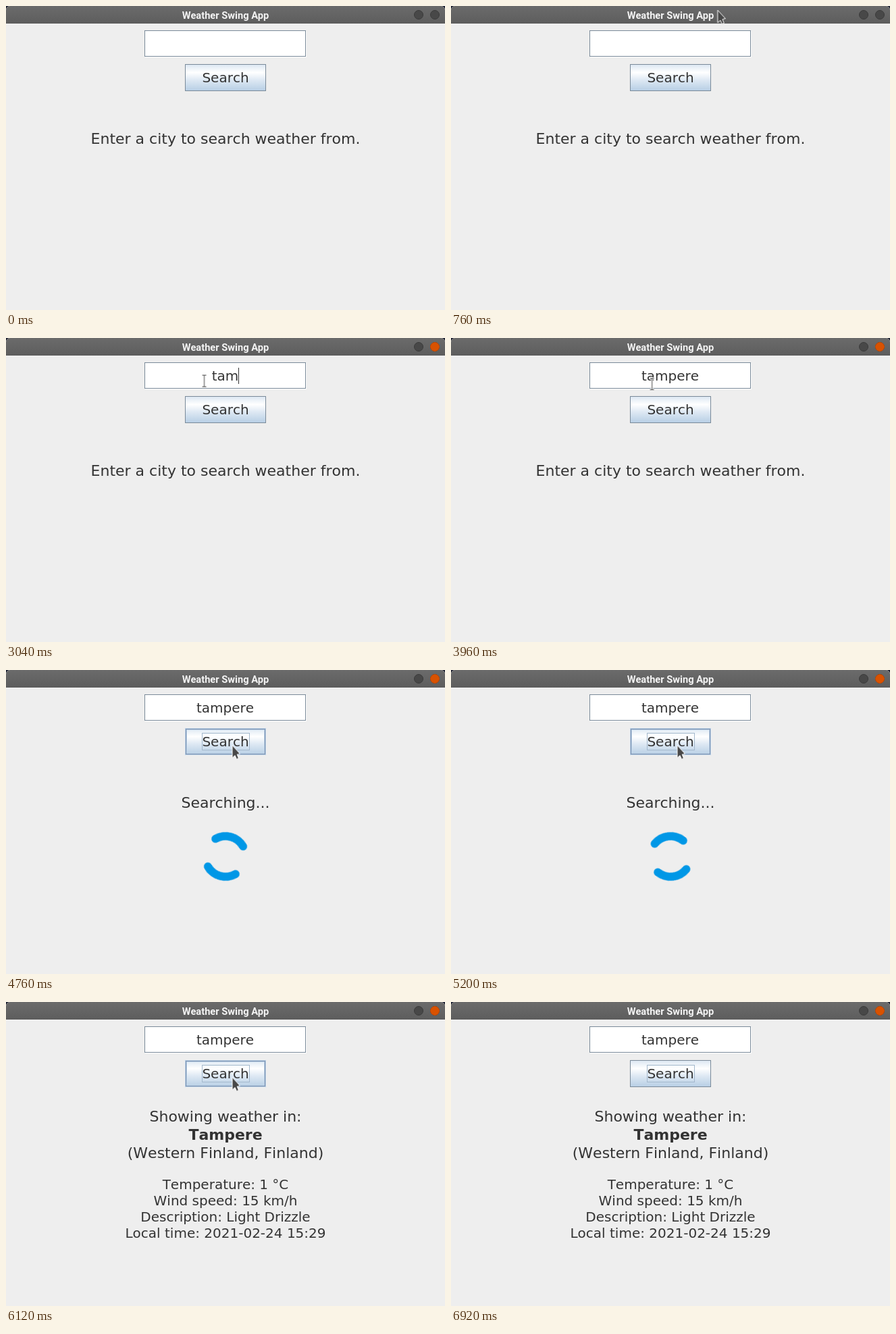
An HTML page for the animation above (7000 ms loop, 650 by 450 pixels).

```html
<!DOCTYPE html>
<html lang="en">
<head>
<meta charset="utf-8">
<title>Weather Swing App</title>
<style>
  html, body { margin: 0; width: 100%; height: 100%; overflow: hidden; }
  body { background: #171b2c; }
  div, p, i, svg { position: absolute; left: 0; top: 0; box-sizing: border-box; margin: 0; }
  #app {
    width: 650px; height: 450px; overflow: hidden;
    border-radius: 6px 6px 0 0; background: #eee; color: #333;
    font: 20px/24px "DejaVu Sans", sans-serif; font-kerning: none;
  }
  #bar {
    width: 650px; height: 26px;
    background: linear-gradient(#6b6b6b, #5d5d5d);
  }
  #bar p {
    top: 1px; width: 650px; text-align: center; color: #f4f4f4;
    font: bold 14.667px/26px Roboto, sans-serif;
  }
  #bar i {
    left: 628px; top: 6px; width: 14px; height: 14px; border-radius: 50%;
    background: #484848; border: 1px solid #3b3b3b;
  }
  #bar #minimize { left: 604px; }
  #bar #close { background: #d95200; border-color: #c84c00; }

  #field {
    left: 205px; top: 36px; width: 239px; height: 39px; padding-top: 7px;
    background: #fff; border: 1px solid #7a8a99; box-shadow: 1px 1px #fff;
    text-align: center;
  }
  #typed { position: relative; display: inline-block; height: 24px; vertical-align: top; }
  #caret { left: 100%; width: 1px; height: 24px; background: #333; }

  #button {
    left: 265px; top: 86px; width: 120px; height: 40px;
    border: 1px solid #7a8a99;
    background: linear-gradient(#dde8f3, #fff 30%, #dde8f3 60%, #b8cfe5);
  }
  #button div { left: -1px; top: -1px; width: 120px; height: 40px; }
  #hover { border: 1px solid #b8cfe5; box-shadow: inset 0 0 0 1px #7a8fae, inset 0 0 0 2px #b8cfe5; }
  #press { background: #b8cfe5; border: 1px solid #7a8a99; border-width: 2px 1px 1px 2px; }
  #button #focus { left: 24px; top: 6px; width: 71px; height: 26px; border: 1px solid #a3b8cc; }
  #button p { left: -1px; top: 7px; width: 120px; text-align: center; }

  .line { width: 650px; text-align: center; white-space: pre; }
  .big { font-size: 22px; line-height: 27px; }
  .mid { top: 183px; }
  .place { top: 156px; }
  .facts { top: 258px; }
  #spinner { left: 285px; top: 236px; width: 80px; height: 80px; }
  #pointer { overflow: visible; }
</style>
</head>
<body>
<div id="app">
  <div id="bar">
    <p>Weather Swing App</p>
    <i id="minimize"></i><i></i><i id="close"></i>
  </div>

  <div id="field"><span id="typed"><i id="caret"></i></span></div>

  <div id="button">
    <div id="hover"></div><div id="press"></div><div id="focus"></div>
    <p>Search</p>
  </div>

  <p id="hint" class="line big mid">Enter a city to search weather from.</p>

  <div id="busy">
    <p class="line big mid">Searching...</p>
    <svg id="spinner" viewBox="-40 -40 80 80" fill="none" stroke="#0097e6" stroke-width="12" stroke-linecap="round">
      <path d="M30 0A30 30 0 0 1 0 30M-30 0A30 30 0 0 1 0-30"/>
    </svg>
  </div>

  <div id="result">
    <p class="line big place">Showing weather in:
<strong>Tampere</strong>
(Western Finland, Finland)</p>
    <p class="line facts">Temperature: 1 °C
Wind speed: 15 km/h
Description: Light Drizzle
Local time: 2021-02-24 15:29</p>
  </div>

  <svg id="pointer" width="1" height="1">
    <path id="arrow" d="M0 0V18.5L4 15L6.5 20.5L9.5 19.2L7.2 13.6L11.5 12.5Z"
      fill="#484848" stroke="#fff" stroke-linejoin="round"/>
    <g id="beam" fill="none">
      <path d="M-3-8.5H3M0-8.5V8.5M-3 8.5H3" stroke="#fff" stroke-width="3"/>
      <path d="M-3-8.5H3M0-8.5V8.5M-3 8.5H3" stroke="#444"/>
    </g>
  </svg>
</div>

<script>
  const LOOP = 7000;
  const $ = id => document.getElementById(id);

  // Each key is [ms, value]; the last value holds to the end of the loop.
  function track(el, prop, keys, easing = 'linear') {
    const frames = [...keys, [LOOP, keys[keys.length - 1][1]]]
      .map(([ms, value]) => ({ offset: ms / LOOP, [prop]: value, easing }));
    el.animate(frames, { duration: LOOP, iterations: Infinity });
  }

  // Shows an element only inside the given [from, to] spans.
  function show(id, ...spans) {
    const keys = spans.flatMap(([from, to]) => [[from, 1], [to, 0]]);
    if (keys[0][0] > 0) keys.unshift([0, 0]);
    track($(id), 'opacity', keys.filter(k => k[0] < LOOP), 'step-end');
  }

  const typeTimes = [2640, 2800, 2960, 3120, 3240, 3360, 3480];
  [...'tampere'].forEach((char, n) => {
    const letter = document.createElement('span');
    letter.textContent = char;
    $('typed').insertBefore(letter, $('caret'));
    track(letter, 'fontSize', [[0, '0px'], [typeTimes[n], '20px']], 'step-end');
  });

  track($('close'), 'opacity', [[0, 0], [1680, 0], [1880, 1]]);
  show('caret', [1740, 2240], [2640, 3960]);
  show('hover', [4100, 6458]);
  show('press', [4440, 4560]);
  show('focus', [4440, LOOP]);
  show('hint', [0, 4600]);
  show('busy', [4600, 5480]);
  show('result', [5480, LOOP]);

  // One turn per second.
  $('spinner').animate({ rotate: ['146.4deg', '2666.4deg'] }, { duration: LOOP, iterations: Infinity });

  const path = [
    [0, 400, -30], [600, 400, -24], [760, 395, 6], [1000, 350, 40],
    [1440, 292.5, 65.5], [2800, 292.5, 65.5], [3000, 293.5, 63.5], [3040, 293.5, 63.5],
    [3480, 297.5, 68], [3960, 297.5, 68], [4300, 335, 111.5],
    [6400, 335, 111.5], [6640, 345, 6], [6680, 347, -30]
  ];
  track($('pointer'), 'translate', path.map(([ms, x, y]) => [ms, `${x}px ${y}px`]));
  show('beam', [972, 4015], [6483, 6572]);
  show('arrow', [0, 972], [4015, 6483], [6572, LOOP]);
</script>
</body>
</html>
```
